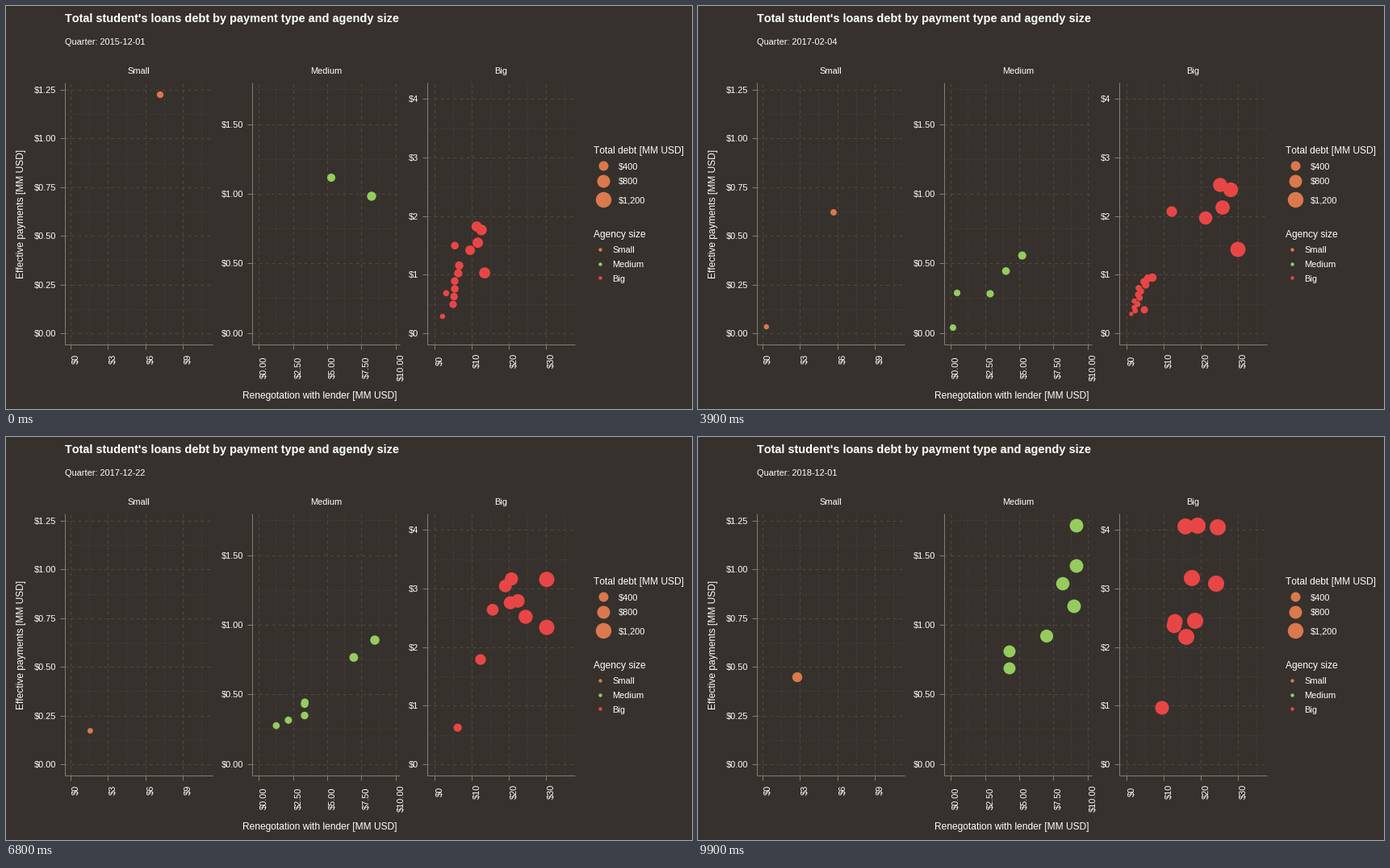
A matplotlib script that plays this animation: 850 by 500 pixels, repeating every 10000 ms.

```python
import matplotlib.pyplot as plt
import numpy as np
from matplotlib.animation import FuncAnimation

W, H, FRAMES, DAYS = 850, 500, 100, 1096
BG, GRID, AXIS, WHITE = "#36312C", "#504940", "#827D77", "#FFFFFF"
ORANGE, GREEN, RED = "#DB784D", "#95CC5E", "#E84646"
TOP, BOTTOM, PANEL_W = 95, 420, 183

plt.rcParams.update({
    "font.family": "Liberation Sans",
    "text.parse_math": False,
    "text.kerning_factor": 6,
})

fig = plt.figure(figsize=(W / 72, H / 72), dpi=72, facecolor=BG)
ax = fig.add_axes([0, 0, 1, 1])
ax.set(xlim=(0, W), ylim=(H, 0))
ax.axis("off")


def label(x, y, s, size=11, ha="left", **kw):
    return ax.text(x, y, s, size=size, ha=ha, va="baseline", color=WHITE,
                   rotation_mode="anchor", **kw)


def line(x0, y0, x1, y1, color=GRID, style="-"):
    ax.plot([x0, x1], [y0, y1], color=color, lw=1, ls=style, zorder=1,
            dash_capstyle="butt", solid_capstyle="butt")


def discs(x, y, r, colors):
    return ax.scatter(x, y, s=(2 * np.asarray(r)) ** 2, c=colors,
                      linewidths=0, snap=False, zorder=3)


def panel(name, left, xticks, yticks, fmt_x, fmt_y, label_y):
    """Ticks are (first pixel, pixel step, value step, count)."""
    right = left + PANEL_W
    x0, dx, vx, nx = xticks
    y0, dy, vy, ny = yticks
    dashed, dotted = (0, (4, 4)), (0, (1, 3))
    for i in range(2 * nx):
        x = round(x0 + dx * i / 2)
        if x < right:
            line(x, BOTTOM, x, TOP, style=dotted if i % 2 else dashed)
    for i in range(2 * ny):
        y = round(y0 - dy * i / 2)
        if y > TOP:
            line(left, y, right, y, style=dotted if i % 2 else dashed)
    for i in range(nx):
        x = round(x0 + dx * i)
        line(x, BOTTOM, x, BOTTOM + 6, AXIS)
        label(x + 10, label_y, fmt_x.format(vx * i), ha="center", rotation=90)
    for i in range(ny):
        y = round(y0 - dy * i)
        line(left - 6, y, left, y, AXIS)
        label(left - 11, y + 4, fmt_y.format(vy * i), ha="right")
    line(left, TOP, left, BOTTOM, AXIS)
    line(left, BOTTOM, right, BOTTOM, AXIS)
    label(left + PANEL_W / 2, 84, name, ha="center")


panel("Small", 73, (80, 46.3, 3, 4), (406, 60.4, .25, 6), "${:.0f}", "${:.2f}", 438)
panel("Medium", 305, (313, 42.5, 2.5, 5), (405.5, 86.3, .5, 4), "${:.2f}", "${:.2f}", 448.5)
panel("Big", 522, (531, 46, 10, 4), (406, 72.7, 1, 5), "${:.0f}", "${:.0f}", 440)

label(73, 20, "Total student's loans debt by payment type and agendy size", 14.55, weight="bold")
date = label(73, 48, "")
label(22, 258, "Effective payments [MM USD]", 12, "center", rotation=90)
label(388.5, 487, "Renegotation with lender [MM USD]", 12, "center")

label(728, 183, "Total debt [MM USD]", 12)
for y, r, s in [(197.5, 6, "$400"), (216.5, 8, "$800"), (240, 9.7, "$1,200")]:
    discs([740], [y], [r], ORANGE)
    label(759, y + 5, s)
label(728, 287, "Agency size", 12)
for y, c, s in [(301.5, ORANGE, "Small"), (319.5, GREEN, "Medium"), (336.5, RED, "Big")]:
    discs([736.5], [y], [2.2], c)
    label(751, y + 5, s)

# Per group: left end of the x scale, then radius = base + gain * u ** power
STYLE = {ORANGE: (80, 3.2, 1.4, 1), GREEN: (313, 4, 1.9, 1), RED: (531, 0, 10, .4)}
FLOOR = 406
STAGES = (39, 57, 90, 99)
dots = []


def dot(color, *path, at=STAGES, start=0, end=FRAMES, opening=(1, 1)):
    """Path points belong to the last times of `at`; opening scales them at t = 0."""
    dots.append((color, at[-len(path):], np.array(path).T, start, end, opening))


def pose(i, color, at, path, opening):
    left, base, gain, power = STYLE[color]
    # The cloud opens out, then swells sideways and sags near t = 82.
    wide = np.interp(i, (0, 39, 57, 82, 90), (opening[0], 1, 1, 1.17, 1))
    tall = np.interp(i, (0, 39, 57, 82, 90), (opening[1], 1, 1, .92, 1))
    x = left + (np.interp(i, at, path[0]) - left) * wide
    y = FLOOR - (FLOOR - np.interp(i, at, path[1])) * tall
    u = max(0, (x - left) / 160)
    late = 2.6 * max(0, (i - 57) / 42) ** 3
    return x, y, np.clip(base + gain * u ** power + late, 1.8, 10)


# Small agencies
dot(ORANGE, (191, 110), (212, 147), (248, 190), (168, 256), (117, 282),
    at=(0, 15, 25, 39, 57), end=58)
dot(ORANGE, (82, 404), (93, 380), (122, 329), (123, 298),
    at=(33, 57, 90, 99), start=33)

# Medium agencies
EARLY = (0, 15, 57, 90, 99)
dot(GREEN, (403, 213), (345, 350), (409, 313), (450, 180), (469, 110), at=EARLY)
dot(GREEN, (453, 236), (352, 361), (439, 271), (463, 197), (469, 160), at=EARLY)
dot(GREEN, (316, 399), (324, 385), (352, 299), (386, 287), start=17)
dot(GREEN, (321, 356), (334, 365), (431, 249), (466, 210), start=33)
dot(GREEN, (362, 357), (349, 366), (400, 298), (432, 247), start=33)
dot(GREEN, (334, 369), (374, 310), (386, 266), start=41)
dot(GREEN, (340, 366), (418, 254), (452, 182), start=50)

# Big agencies: the leaders
OPEN = dict(opening=(.45, .72))
dot(RED, (647, 222), (624, 189), (611, 125), (604, 111), **OPEN)
dot(RED, (660, 228), (666, 187), (649, 131), (644, 112), **OPEN)
dot(RED, (629, 263), (614, 197), (610, 136), (612, 175), **OPEN)
dot(RED, (650, 250), (643, 236), (622, 177), (642, 182), **OPEN)
dot(RED, (587, 255), (598, 212), (598, 198), (590, 234), **OPEN)
dot(RED, (669, 302), (682, 246), (617, 198), (616, 228), **OPEN)
dot(RED, (563, 337), (586, 272), (580, 270), (605, 248), **OPEN)
dot(RED, (553, 377), (565, 361), (543, 355), (575, 336), **OPEN)
dot(RED, (631, 223), (619, 142), (619, 110), start=50)
dot(RED, (630, 217), (595, 161), (591, 229), start=50)
for spot in [(610, 212), (632, 236), (633, 243), (574, 295)]:
    dot(RED, spot, start=50, end=66)

# Big agencies: a swarm strung along a line that shrinks towards the corner
rng = np.random.default_rng(4)
for k in range(12):
    s, odd = k / 11, k % 2
    jitter = rng.uniform(-4, 4)
    dot(RED, (558 - 8 * s + jitter, 322 + 53 * s), (561 - 20 * s + jitter, 303 + 71 * s),
        (554 - 17 * s + jitter, 338 + 44 * s), (541 - 9 * s, 352 + 35 * s),
        at=(0, 15, 39, 57), start=8 * odd, end=41 if odd else 58)

points = discs([0], [0], [0], BG)
first_day = np.datetime64("2015-12-01")


def update(i):
    live = [d for d in dots if d[3] <= i <= d[4]]
    x, y, r = np.array([pose(i, *d[:3], d[5]) for d in live]).T
    points.set_offsets(np.column_stack([x, y]))
    points.set_sizes((2 * r) ** 2)
    points.set_facecolor([d[0] for d in live])
    date.set_text(f"Quarter: {first_day + i * DAYS // (FRAMES - 1)}")
    return points, date


anim = FuncAnimation(fig, update, frames=FRAMES, interval=100, repeat=True,
                     repeat_delay=0, blit=False)
plt.show()
```
